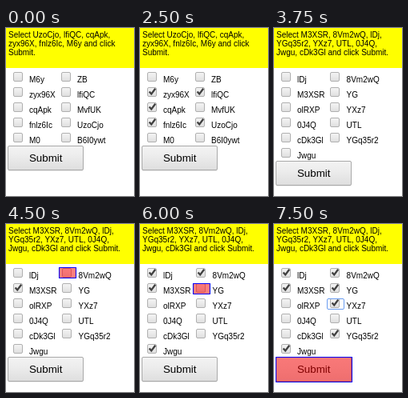
Recreate the animation shown at these times as an HTML page. Size 160 px wide and 210 px high, loop 8 s.

```html
<!DOCTYPE html>
<html lang="en">
<head>
<meta charset="utf-8">
<title>Checkbox task</title>
<style>
html, body { margin: 0; width: 100%; height: 100%; overflow: hidden; background: #fff; }
svg { display: block; width: 160px; height: 210px; }
text { font: 10px "Liberation Sans", Arial, sans-serif; white-space: pre; }
.button { font-size: 13.333px; text-anchor: middle; }
</style>
</head>
<body>
<svg id="stage" viewBox="0 0 160 210" xmlns="http://www.w3.org/2000/svg">
  <defs>
    <linearGradient id="face" x1="0" y1="0" x2="0" y2="1">
      <stop offset="0" stop-color="#f3f3f3"/>
      <stop offset=".38" stop-color="#ededed"/>
      <stop offset="1" stop-color="#dedede"/>
    </linearGradient>
  </defs>
</svg>
<script>
const STEP = 250, LOOP = 8000, PITCH = 19;
const svg = document.getElementById('stage');

// Each task: first step, prompt, two label columns, click order as [column, row].
const tasks = [
  {
    start: 0,
    prompt: ['Select UzoCjo, lfiQC, cqApk,', 'zyx96X, fnlz6Ic, M6y and click', 'Submit.'],
    labels: [['M6y', 'zyx96X', 'cqApk', 'fnlz6Ic', 'M0'], ['ZB', 'lfiQC', 'MvfUK', 'UzoCjo', 'B6I0ywt']],
    cols: [{ x: 6, w: 21, box: 9, text: 29 }, { x: 66, w: 20, box: 69, text: 89 }],
    clicks: [[1, 3], [1, 1], [0, 2], [0, 1], [0, 3]],
    ringFrom: Infinity
  },
  {
    start: 15,
    prompt: ['Select M3XSR, 8Vm2wQ, lDj,', 'YGq35r2, YXz7, UTL, 0J4Q,', 'Jwgu, cDk3Gl and click Submit.'],
    labels: [['lDj', 'M3XSR', 'olRXP', '0J4Q', 'cDk3Gl', 'Jwgu'], ['8Vm2wQ', 'YG', 'YXz7', 'UTL', 'YGq35r2']],
    cols: [{ x: 6, w: 21, box: 9, text: 29 }, { x: 66, w: 22, box: 70, text: 90.6 }],
    clicks: [[0, 1], [1, 0], [0, 5], [0, 0], [1, 1], [1, 4], [1, 2]],
    ringFrom: 4
  }
];

function add(parent, tag, attrs, content) {
  const el = document.createElementNS(svg.namespaceURI, tag);
  for (const key in attrs) el.setAttribute(key, attrs[key]);
  if (content) el.textContent = content;
  parent.appendChild(el);
  return el;
}

function show(el, on) {
  el.setAttribute('visibility', on ? 'visible' : 'hidden');
}

function addRect(parent, x, y, w, h, attrs) {
  return add(parent, 'rect', { x: x + 0.5, y: y + 0.5, width: w - 1, height: h - 1, ...attrs });
}

function addHighlight(parent, x, y, w, h) {
  return addRect(parent, x, y, w, h, { fill: '#f00', 'fill-opacity': 0.5, stroke: '#00f' });
}

function build(task) {
  const g = add(svg, 'g', {});
  add(g, 'rect', { width: 160, height: 50, fill: '#ff0' });
  task.prompt.forEach((line, i) => add(g, 'text', { x: 3, y: 12 + 11 * i }, line));

  task.labels.forEach((names, c) => names.forEach((name, r) => {
    const y = 55 + PITCH * r;
    addRect(g, task.cols[c].box, y, 12, 12, { rx: 1.5, fill: 'url(#face)', stroke: '#b0b0b0' });
    add(g, 'text', { x: task.cols[c].text, y: y + 13 }, name);
  }));

  task.marks = task.clicks.map(([c, r], i) => {
    const { x, w, box } = task.cols[c];
    const y = 55 + PITCH * r;
    return {
      ring: i >= task.ringFrom &&
        addRect(g, x, y, w, 14, { rx: 1.5, fill: 'none', stroke: '#6a9cf0' }),
      check: add(g, 'path', {
        d: `M${box + 2.6} ${y + 5.6}l2.6 2.9l5 -6.7`,
        fill: 'none', stroke: '#404040', 'stroke-width': 2.3
      })
    };
  });

  const top = 52 + PITCH * Math.max(...task.labels.map(col => col.length));
  add(g, 'rect', { x: 2, y: top + 1, width: 95, height: 31, rx: 2, fill: '#000', 'fill-opacity': 0.08 });
  addRect(g, 2, top, 95, 31, { rx: 1.5, fill: 'url(#face)', stroke: '#a9a9a9' });
  add(g, 'text', { x: 49.7, y: top + 20, class: 'button' }, 'Submit');

  task.targets = task.clicks.map(([c, r]) => {
    const { x, w } = task.cols[c];
    return addHighlight(g, x, r ? 55 + PITCH * r : 54, w, 14);
  });
  task.targets.push(addHighlight(g, 2, top, 96, 32));
  task.group = g;
}

function render(time) {
  const step = Math.floor((time % LOOP) / STEP);
  const active = step < tasks[1].start ? tasks[0] : tasks[1];
  for (const task of tasks) {
    task.group.style.display = task === active ? '' : 'none';
  }
  // Odd steps point at the next target; even steps apply the click.
  const total = active.clicks.length;
  const k = Math.min(step - active.start, 2 * total + 1);
  const done = k >> 1;
  active.marks.forEach(({ check, ring }, i) => {
    show(check, i < done);
    if (ring) show(ring, i === done - 1);
  });
  active.targets.forEach((el, i) => show(el, k % 2 === 1 && i === done));
}

tasks.forEach(build);
const began = performance.now();
function tick() {
  render(performance.now() - began);
  requestAnimationFrame(tick);
}
tick();
</script>
</body>
</html>
```
